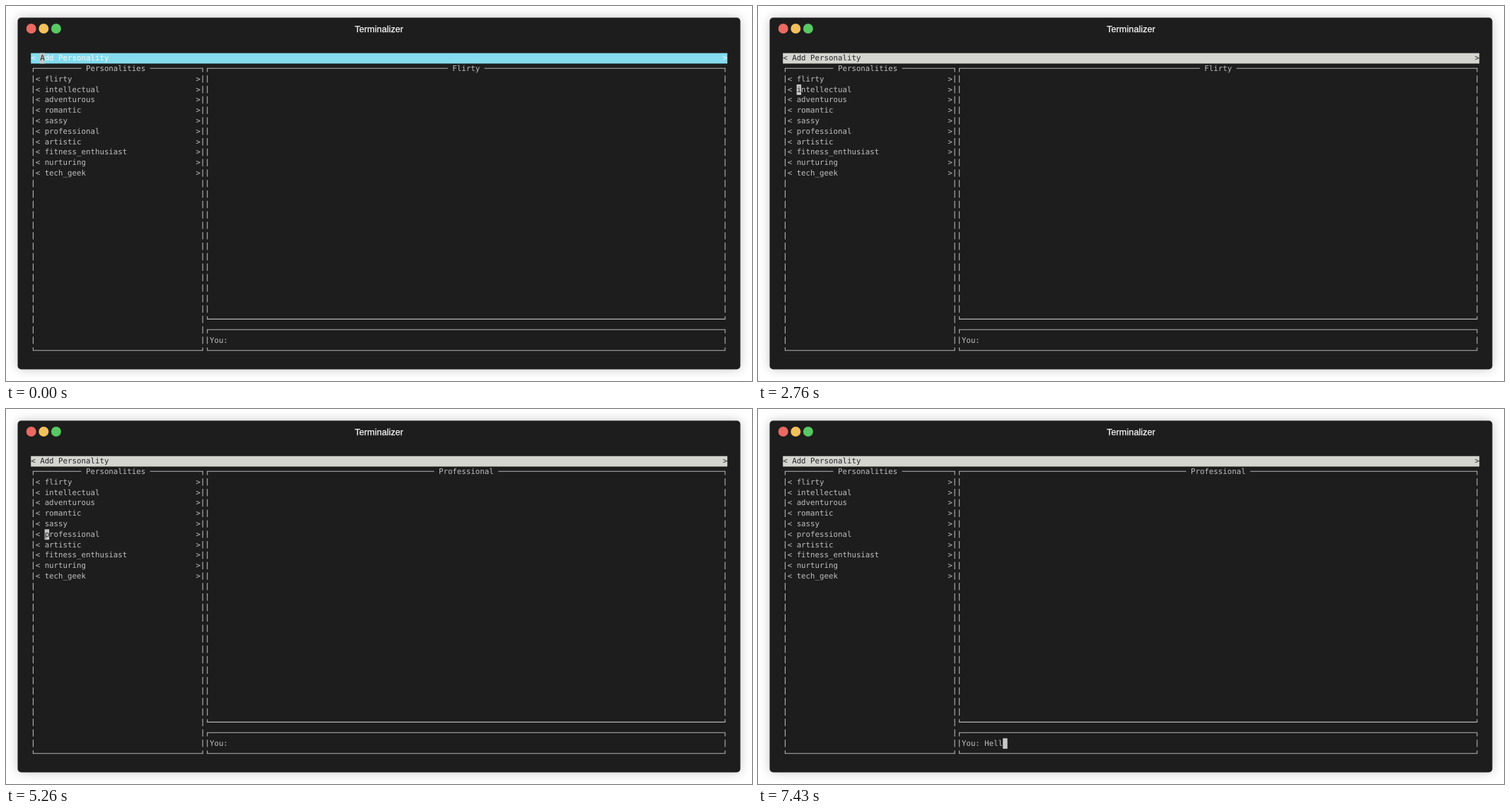
Write an HTML page with a canvas that moves like this. It is 1055 px wide and 531 px high and loops after 8000 ms.

```html
<!DOCTYPE html>
<html lang="en">
<head>
<meta charset="utf-8">
<title>Terminal</title>
<style>
html, body { margin: 0; width: 100%; height: 100%; overflow: hidden; background: #fff; }
canvas { display: block; }
</style>
</head>
<body>
<canvas id="stage" width="1055" height="531"></canvas>
<script>
const ctx = document.getElementById('stage').getContext('2d');
const LOOP = 8000;
const LEFT = 35.2, TOP = 66.7, CELL_W = 6.48, CELL_H = 14.8, COLS = 152;
const BACK = '#1d1d1d', TEXT = '#bebebe', LINE = '#b4b4b4', CURSOR = '#c7c7c7', DARK = '#232628';
const HALF_BAR = 5.2; // half the height of a box-drawing stroke

const personalities = ['flirty', 'intellectual', 'adventurous', 'romantic', 'sassy',
  'professional', 'artistic', 'fitness_enthusiast', 'nurturing', 'tech_geek'];
const FIRST_ROW = 2, INPUT_ROW = 27, INPUT_COL = 44;

// Each entry is merged into the state when its time comes.
const input = typed => ({ typed, cursor: [INPUT_COL + typed.length, INPUT_ROW] });
const pick = index => ({ cursor: [3, FIRST_ROW + index] });
const timeline = [
  [0, { focused: true, title: 'Flirty', typed: '', cursor: [2, 0] }],
  [1320, { focused: false, cursor: null }],
  [1540, input('')],
  [2270, pick(0)], [2760, pick(1)], [2970, pick(2)],
  [3180, pick(3)], [3410, pick(4)], [4070, pick(5)],
  [5260, { title: 'Professional' }],
  [5690, input('')],
  [6880, input('H')], [7190, input('He')], [7280, input('Hel')], [7430, input('Hell')]
];

const colX = col => LEFT + col * CELL_W;
const midX = col => colX(col + 0.5);
const rowY = row => TOP + row * CELL_H;
const lineY = row => rowY(row) + 6.7;

function write(text, col, row, color = TEXT) {
  ctx.fillStyle = color;
  [...text].forEach((char, i) => ctx.fillText(char, colX(col + i), rowY(row) + 10.5));
}

function stroke(x1, y1, x2, y2) {
  ctx.beginPath();
  ctx.moveTo(x1, y1);
  ctx.lineTo(x2, y2);
  ctx.stroke();
}

function box(left, right, top, bottom, title) {
  const x1 = midX(left), x2 = midX(right), y1 = lineY(top), y2 = lineY(bottom);
  if (title) {
    const start = Math.floor((left + right + 1 - title.length) / 2);
    stroke(x1, y1, colX(start - 1), y1);
    stroke(colX(start + title.length + 1), y1, x2, y1);
    write(title, start, top);
  } else {
    stroke(x1, y1, x2, y1);
  }
  stroke(x1, y2, x2, y2);
  for (const x of [x1, x2]) {
    stroke(x, y1 - 0.5, x, y1 + HALF_BAR);
    stroke(x, y2 - HALF_BAR + 1, x, y2 + 0.5);
    for (let row = top + 1; row < bottom; row++) {
      stroke(x, lineY(row) - HALF_BAR + 0.4, x, lineY(row) + HALF_BAR + 0.4);
    }
  }
}

function drawWindow() {
  ctx.fillStyle = '#fff';
  ctx.fillRect(0, 0, 1055, 531);
  ctx.save();
  ctx.shadowColor = 'rgba(0,0,0,.22)';
  ctx.shadowBlur = 15;
  ctx.fillStyle = BACK;
  ctx.beginPath();
  ctx.roundRect(16.5, 16.5, 1022, 498, 5);
  ctx.fill();
  ctx.restore();

  ['#ec6961', '#f3c05c', '#58c865'].forEach((color, i) => {
    ctx.fillStyle = color;
    ctx.beginPath();
    ctx.arc(35.7 + i * 17.6, 32, 7, 0, Math.PI * 2);
    ctx.fill();
  });

  ctx.font = '12.75px "Liberation Sans", Arial, sans-serif';
  ctx.textAlign = 'center';
  ctx.fillStyle = ctx.strokeStyle = '#fff';
  ctx.lineWidth = 0.25;
  ctx.fillText('Terminalizer', 527.5, 36.5);
  ctx.strokeText('Terminalizer', 527.5, 36.5);
  ctx.textAlign = 'left';
}

function drawCursor(col, row, char) {
  ctx.fillStyle = CURSOR;
  ctx.fillRect(colX(col), rowY(row), CELL_W, CELL_H);
  write(char, col, row, DARK);
}

function draw(time) {
  const state = {};
  for (const [start, change] of timeline) if (start <= time) Object.assign(state, change);

  drawWindow();
  ctx.font = '10.77px "DejaVu Sans Mono", monospace';
  ctx.strokeStyle = LINE;
  ctx.lineWidth = 1.1;

  ctx.fillStyle = state.focused ? '#84dcee' : '#d5d5d0';
  ctx.fillRect(LEFT, rowY(0), COLS * CELL_W, CELL_H);
  const barText = state.focused ? '#f7f7f7' : DARK;
  write('< Add Personality', 0, 0, barText);
  write('>', COLS - 1, 0, barText);

  box(0, 37, 1, 28, 'Personalities');
  box(38, 151, 1, 25, state.title);
  box(38, 151, 26, 28);
  personalities.forEach((name, i) => {
    write('< ' + name, 1, FIRST_ROW + i);
    write('>', 36, FIRST_ROW + i);
  });
  write('You: ' + state.typed, 39, INPUT_ROW);

  if (state.cursor) {
    const [col, row] = state.cursor;
    const char = row === 0 ? 'A' : row === INPUT_ROW ? '' : personalities[row - FIRST_ROW][0];
    drawCursor(col, row, char);
  }
}

ctx.textRendering = 'geometricPrecision';
const began = performance.now();
function tick() {
  draw((performance.now() - began) % LOOP);
  requestAnimationFrame(tick);
}
tick();
</script>
</body>
</html>
```
